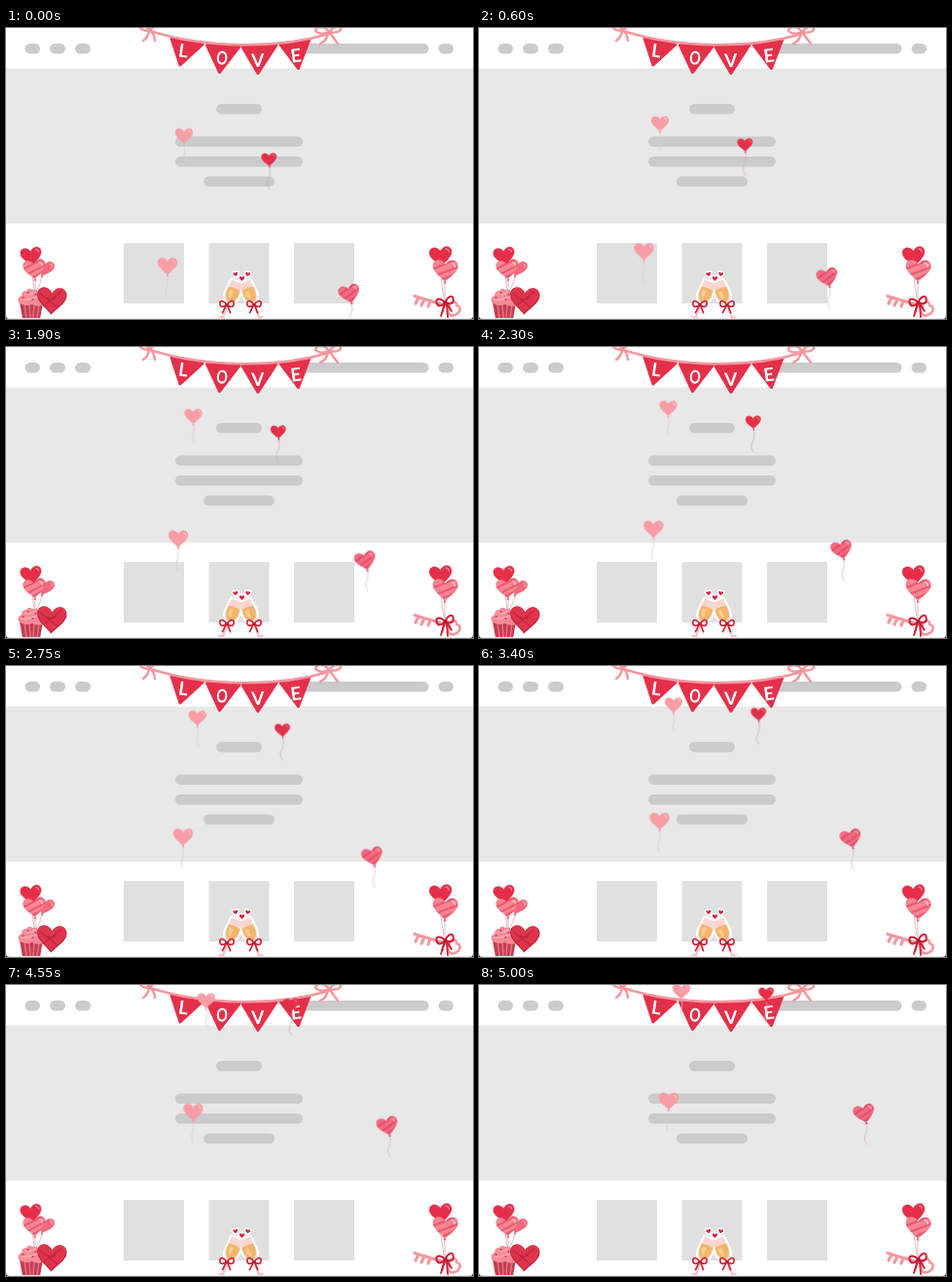
An HTML page for the animation above (5060 ms loop, 480 px wide and 299 px high).

```html
<!DOCTYPE html>
<html lang="en">
<head>
<meta charset="utf-8">
<title>Love balloons</title>
<style>
  html, body { margin: 0; width: 100%; height: 100%; overflow: hidden; background: #fff; }
  svg { display: block; width: 100%; height: 100%; }
  .bars rect { fill: #cbcbcb; }
  .tiles rect { fill: #e0e0e0; }
  .flags path { fill: #e5304a; stroke: #e5304a; stroke-width: 3; stroke-linejoin: round; }
  .letters text { font: 700 19px Lato, "Open Sans", sans-serif; fill: #fff; text-anchor: middle; }
  .line { fill: none; stroke-linecap: round; stroke-linejoin: round; }
</style>
</head>
<body>
<svg viewBox="0 0 480 299" preserveAspectRatio="none">
  <defs>
    <path id="heart" d="M0 9C-3 5.500-10 1.500-10-3.500C-10-9-3-10 0-4.500C3-10 10-9 10-3.500C10 1.500 3 5.500 0 9Z"/>
    <clipPath id="heartClip"><use href="#heart"/></clipPath>
    <g id="bow">
      <path class="line" d="M-1 1L-5 9M1 1L4 9" stroke="#cf1f35" stroke-width="1.8"/>
      <path class="line" d="M0 0C-3-5-8-6-8-2C-8 3-4 3 0 0C4 3 8 3 8-2C8-6 3-5 0 0Z" fill="#e8475a" stroke="#cf1f35" stroke-width="1.8"/>
      <circle r="1.7" fill="#b51a33"/>
    </g>
    <g id="glass">
      <path class="line" d="M0 12V28" stroke="#f9bfc4" stroke-width="2.200"/>
      <path d="M-6 30Q0 25 6 30Z" fill="#f9bfc4"/>
      <path d="M-6-11H6L7 3Q6 12 0 13Q-6 12-7 3Z" fill="#fbd6d0"/>
      <path d="M-6.300-3Q0-5 6.300-3L6.300 3Q5 10.500 0 11Q-5 10.500-6.300 3Z" fill="#f3b56c"/>
      <path d="M-4-1H0V8Q-4 7-4-1Z" fill="#f8cd92"/>
    </g>
    <path id="glassShape" d="M-6-11H6L7 3Q6 12 1 13V27L6 30H-6L-1 27V13Q-6 12-7 3Z"/>
  </defs>

  <rect width="480" height="299" fill="#fff"/>
  <rect y="41.5" width="480" height="159.5" fill="#e8e8e8"/>
  <g class="bars" id="bars"></g>
  <g class="tiles">
    <rect x="121" y="221" width="62" height="62"/>
    <rect x="208.5" y="221" width="62" height="62"/>
    <rect x="296" y="221" width="62" height="62"/>
  </g>

  <!-- bunting -->
  <g class="flags">
    <path d="M170 10.500L202 17L179 38Z"/>
    <path d="M206.500 17.500L240 19L219.500 45.500Z"/>
    <path d="M243 19.500L278 17.500L259 46.500Z"/>
    <path d="M282 17L312 11.500L300.500 41.500Z"/>
  </g>
  <g class="line" stroke="#f5969f" stroke-width="2.4">
    <path d="M148 3C205 21 278 22 332 6"/>
    <path d="M148 2C142-4 137-3 138 0Q142 4 148 2C154-4 160-1 166-1M147 3Q146 10 141 13M149 3Q153 8 153 13"/>
    <path d="M332 4C327-3 318-2 318 3Q323 8 332 4C338-3 345-2 344 2Q340 6 332 4M331 5Q330 13 323 16M333 5Q337 11 341 16"/>
  </g>
  <g class="letters">
    <text transform="translate(181.500 30) rotate(8)">L</text>
    <text transform="translate(221.500 37.500) rotate(5) scale(.75 1)">O</text>
    <text transform="translate(259 40) rotate(-2)">V</text>
    <text transform="translate(299 35) rotate(-8)">E</text>
  </g>

  <!-- cupcake and heart box -->
  <path class="line" d="M26 244L29 270M30 257V270M37 255Q36 263 31 270" stroke="#e5a6ad" stroke-width=".8"/>
  <g id="leftHearts"></g>
  <g>
    <path d="M14 282H38L35 299H17Z" fill="#c23c50"/>
    <path class="line" d="M19 284L21 298M24 284L25 298M29 284L28 298M34 284L32 298" stroke="#e4707f" stroke-width="1.6"/>
    <path d="M13 282Q11 277 16 275Q16 270 21 270Q23 266 27 269Q33 268 34 273Q39 273 40 278Q42 282 38 285Q31 287 27 284Q19 287 13 282Z" fill="#f68b97"/>
    <path class="line" d="M16 279Q24 280 35 275M20 273Q25 275 30 271" stroke="#f9abb3" stroke-width="1.500"/>
    <path class="line" d="M17 277h1M22 272h1M27 279h1M34 279h1M30 274h1" stroke="#d82f4c" stroke-width="1.400"/>
    <g transform="translate(47 280) rotate(3) scale(1.520 1.600)">
      <use href="#heart" fill="#b9213a"/>
      <use href="#heart" transform="translate(0 -.5) scale(.94)" fill="#e0344c"/>
      <path class="line" d="M-8-4L4 4M6-6L-5 3" stroke="#bd2740" stroke-width=".8"/>
      <path d="M0 0C-4-4-5 0 0 0C3-5 5-1 0 0Z" fill="#bd2740"/>
    </g>
  </g>

  <!-- key -->
  <path class="line" d="M446 243Q447 260 450 277M451 261V279" stroke="#e5a6ad" stroke-width=".8"/>
  <g id="rightHearts"></g>
  <g class="line" stroke="#f5979f" stroke-width="3.200">
    <path d="M420 275.500L455 286M424 277L421 283M430 279L427 285M436 281L434 286"/>
    <path d="M455 286C458 279 464 281 463 285C469 286 467 293 461 295C455 297 453 291 455 286Z" stroke-width="2.600"/>
  </g>
  <path class="line" d="M451 284L447 296M453 284L454 297" stroke="#cf1f35" stroke-width="1.800"/>
  <use href="#bow" transform="translate(451.500 282) rotate(-12) scale(1.100)"/>

  <!-- champagne -->
  <g>
    <g stroke="#fff" stroke-width="4" stroke-linejoin="round" fill="#fff">
      <use href="#glassShape" transform="translate(233.500 271) rotate(22)"/>
      <use href="#glassShape" transform="translate(249.500 271) rotate(-22)"/>
    </g>
    <use href="#glass" transform="translate(233.500 271) rotate(22)"/>
    <use href="#glass" transform="translate(249.500 271) rotate(-22)"/>
    <use href="#bow" transform="translate(227 284.500) scale(.9)"/>
    <use href="#bow" transform="translate(255 284.500) scale(.9)"/>
    <g fill="#d9243f" stroke="#fff" stroke-width="14" paint-order="stroke" stroke-linejoin="round">
      <use href="#heart" transform="translate(236 253) rotate(-12) scale(.24)"/>
      <use href="#heart" transform="translate(248.500 253) rotate(12) scale(.24)"/>
      <use href="#heart" transform="translate(242.500 257.500) scale(.27)"/>
    </g>
  </g>

  <g id="balloons"></g>
  <path d="M0 298.500H480" stroke="#ececec"/>
  <path d="M0 295.500Q0 299 3.500 299H0ZM480 295.500Q480 299 476.500 299H480Z" fill="#222"/>
</svg>
<script>
const LOOP = 5060, STEP = 50, FRAMES = 101;
const byId = id => document.getElementById(id);

const RED = { fill: '#e52f48', edge: '#d8263f', shine: '#f27f8e' };
const PINK = { fill: '#f89ca5', edge: '#f5929c', shine: '#fcc6ca' };
const ROSE = { fill: '#f2697c', edge: '#e9566b', shine: '#f9aab3' };
const STRIPED = { fill: '#f68592', edge: '#ec6377', shine: '#fbc0c6', stripes: '#ea5b71' };
const DEEP_STRIPED = { fill: '#f26a7f', edge: '#e64f68', shine: '#f9aab3', stripes: '#e44c67' };

const bars = [
  [19.5, 16, 15.5], [45, 16, 16], [71, 16, 16], [290, 16, 144.5], [444.5, 16, 15.5],
  [216, 78, 47], [174, 111.5, 131], [174, 132, 131], [203, 152.5, 73]
];
byId('bars').innerHTML = bars.map(([x, y, w]) =>
  `<rect x="${x}" y="${y}" width="${w}" height="10.5" rx="5.25"/>`).join('');

function heart(x, y, size, tilt, { fill, edge, shine, stripes }) {
  const bands = stripes
    ? `<path clip-path="url(#heartClip)" d="M-12 0L9-9M-11 6L12-4M-8 10L12 1" stroke="${stripes}" stroke-width="1.8"/>`
    : '';
  return `<g transform="translate(${x} ${y}) rotate(${tilt}) scale(${size})">
    <path d="M0 8L-1.300 10.500H1.300Z" fill="${edge}"/>
    <use href="#heart" fill="${fill}" stroke="${edge}" stroke-width=".3"/>${bands}
    <path class="line" d="M5-6Q7.500-5.500 7.500-3" stroke="${shine}" stroke-width="1.200"/></g>`;
}

byId('leftHearts').innerHTML =
  heart(26, 234.5, 1.08, -8, RED) + heart(39.5, 246.5, .95, 16, ROSE) + heart(29, 248, 1.12, -4, STRIPED);
byId('rightHearts').innerHTML =
  heart(447, 234.5, 1.15, -6, RED) + heart(451.5, 249, 1.28, 2, STRIPED);

// Each balloon drifts in a straight line during the loop.
const balloons = [
  { from: [183, 110.5], to: [208, 6.5], size: .9, tilt: 0, look: PINK, thread: '#e3c8ca', string: 'M0 9Q2 14 0 19T1 28' },
  { from: [270.5, 135], to: [295.3, 9], size: .78, tilt: -3, look: RED, thread: '#dba5ab', string: 'M.5 8Q2 16-1 21T.5 31' },
  { from: [166, 244.5], to: [195, 119], size: 1, tilt: 0, look: PINK, thread: '#e3c8ca', string: 'M0 10Q1 17-1 22T-1 32' },
  { from: [353, 273], to: [396, 132], size: 1.07, tilt: -13, look: DEEP_STRIPED, thread: '#dfb0b5', string: 'M2.500 11Q4 16 1.500 21T2.500 32' }
];

for (const { from, to, size, tilt, look, thread, string } of balloons) {
  const g = document.createElementNS('http://www.w3.org/2000/svg', 'g');
  g.innerHTML = `<path class="line" d="${string}" stroke="${thread}" stroke-width=".7"/>` + heart(0, 0, size, tilt, look);
  byId('balloons').append(g);
  const at = ([x, y]) => `translate(${x}px, ${y}px)`;
  g.animate([
    { transform: at(from), easing: `steps(${FRAMES}, jump-none)` },
    { transform: at(to), offset: FRAMES * STEP / LOOP },
    { transform: at(to) }
  ], { duration: LOOP, iterations: Infinity });
}
</script>
</body>
</html>
```
